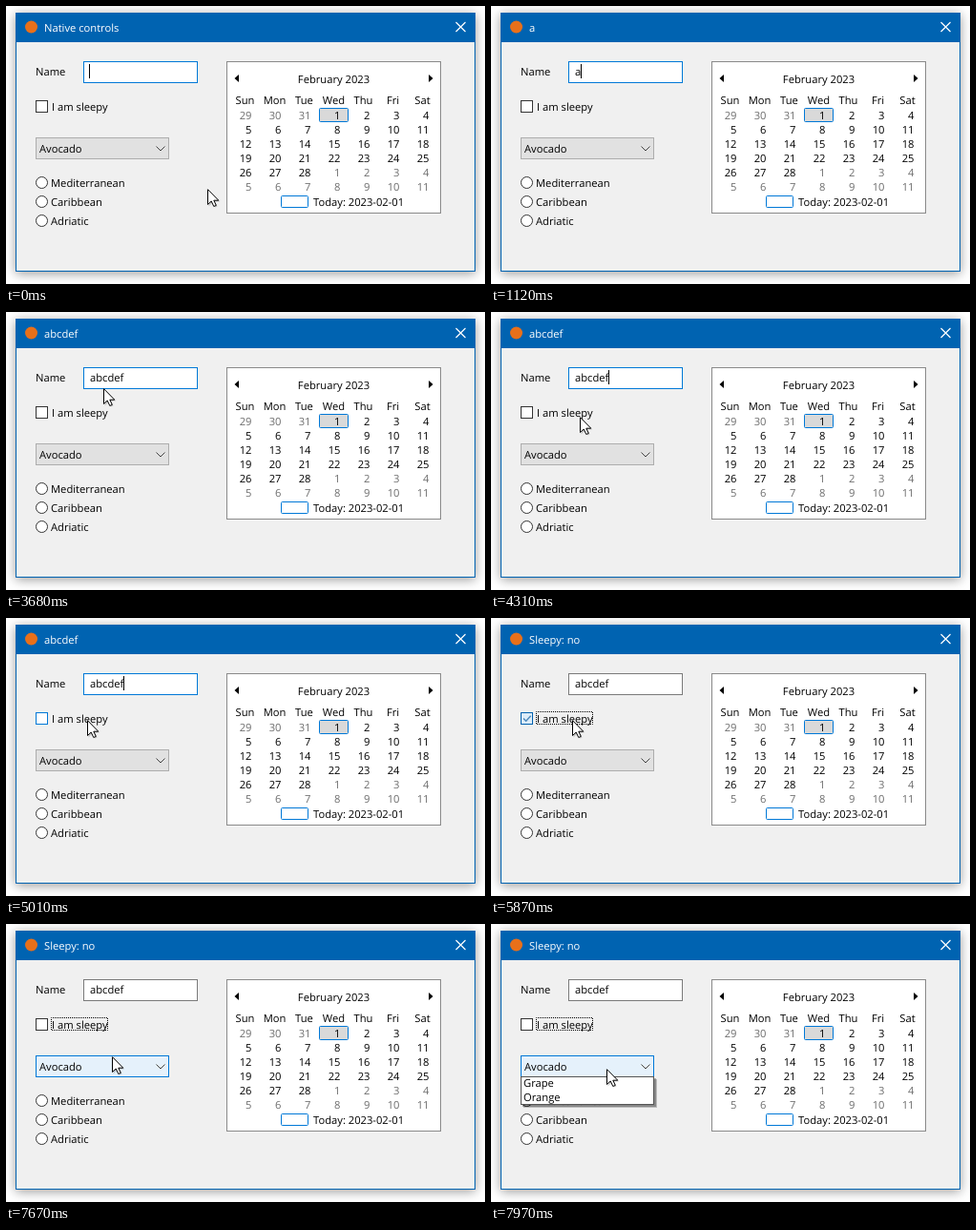
An HTML page for the animation above (8 s loop, 502 px wide and 292 px high).

```html
<!DOCTYPE html>
<html lang="en">
<head>
<meta charset="utf-8">
<title>Native controls</title>
<style>
  html, body { margin: 0; width: 100%; height: 100%; overflow: hidden; background: #fff; }
  #window {
    position: absolute; left: 10px; top: 7px; width: 482px; height: 272px;
    background: #f0f0f0; box-shadow: 0 2px 11px rgba(0, 0, 0, .4);
  }
  svg { position: absolute; left: 0; top: 0; }
  text {
    font: 11.2px "Open Sans", "Noto Sans", sans-serif; text-rendering: geometricPrecision;
    fill: #000; white-space: pre;
  }
  .end { text-anchor: end; }
  .mid { text-anchor: middle; }
  .dim { fill: #6d6d6d; }
  .light { fill: #fff; }
  .line { fill: none; stroke: #000; }
</style>
</head>
<body>
<div id="window"></div>
<svg width="502" height="292" viewBox="0 0 502 292">
  <rect x="10.5" y="7.5" width="481" height="271" fill="none" stroke="#0063b1"/>
  <rect x="10" y="7" width="482" height="31" fill="#0063b1"/>
  <circle cx="26.5" cy="22" r="6.5" fill="#e8701a"/>
  <text id="title" class="light" x="40" y="26.5"></text>
  <path class="line" style="stroke:#fff" stroke-width="1.2" d="M471.5 17l10 10m0-10l-10 10"/>

  <text x="31" y="73">Name</text>
  <rect id="field" x="81.5" y="58.5" width="119" height="22" fill="#fff"/>
  <text id="name" x="88" y="73"></text>
  <rect id="caret" y="61" width="1" height="15"/>

  <rect id="box" x="31.5" y="99.5" width="12" height="12" fill="#fff"/>
  <rect id="press" x="31.5" y="99.5" width="12" height="12" fill="#cce4f7" stroke="#005499"/>
  <path id="check" fill="none" stroke="#005499" stroke-width="1.4" d="M34 105.5l2.700 2.800 5-5.600"/>
  <text x="48" y="110">I am sleepy</text>
  <rect id="focus" class="line" x="47.5" y="98.5" width="59" height="13"
    stroke-dasharray="1" stroke-dashoffset=".5"/>

  <g id="radios"></g>

  <rect id="combo" x="31.5" y="138.5" width="139" height="22"/>
  <text x="35" y="154">Avocado</text>
  <path class="line" style="stroke:#444" d="M157.5 147.5l4.500 4.500 4.500-4.500"/>
  <g id="list">
    <rect x="34" y="163" width="140" height="30" opacity=".22"/>
    <rect x="33" y="162" width="140" height="30" opacity=".28"/>
    <rect x="31.5" y="160.5" width="139" height="29" fill="#fff" stroke="#555"/>
    <text x="34" y="171">Grape</text>
    <text x="34" y="186">Orange</text>
  </g>

  <g id="calendar">
    <rect x="231.5" y="58.5" width="224" height="159" fill="#fff" stroke="#8a8a8a"/>
    <path d="M244 72v8l-4.500-4zM443 72v8l4.500-4z"/>
    <text class="mid" x="343.5" y="81">February 2023</text>
    <rect x="328.5" y="107.5" width="30" height="14" rx="1" fill="#d9d9d9" stroke="#0078d7"/>
    <rect x="288.5" y="199.5" width="28" height="12" rx="1" fill="#fff" stroke="#0078d7"/>
    <text x="322" y="210">Today: 2023-02-01</text>
  </g>

  <g id="cursor">
    <path d="M1.5 1.5v17l4-4 3 5 2-1-2.500-5h5z" opacity=".18"/>
    <path d="M.5.700v15.800l3.700-3.500 2.600 5.500 2.500-1.100-2.500-5.200h5z" fill="#fff" stroke="#000"/>
  </g>
</svg>
<script>
const LOOP = 8000;
const KEY_TIMES = [1120, 1510, 1760, 1920, 2200, 2350];
const FIRST_CLICK = 5150, CLICK_GAP = 685, CLICKS = 4, FADE = 90;

const $ = id => document.getElementById(id);
const set = (id, attrs) => {
  for (const key in attrs) $(id).setAttribute(key, attrs[key]);
};
const show = (id, on) => set(id, { visibility: on ? 'visible' : 'hidden' });
const ease = (t, from, to) => {
  const u = Math.min(1, Math.max(0, (t - from) / (to - from)));
  return u * u * (3 - 2 * u);
};
const bend = (u, a, b, c) => (1 - u) ** 2 * a + 2 * u * (1 - u) * b + u * u * c;
const label = (x, y, text, cls = '') => `<text x="${x}" y="${y}" class="${cls}">${text}</text>`;

$('radios').innerHTML = ['Mediterranean', 'Caribbean', 'Adriatic'].map((text, i) =>
  `<circle cx="37.5" cy="${185.5 + 20 * i}" r="6" fill="#fff" stroke="#333"/>` +
  label(47, 190 + 20 * i, text)).join('');

let days = ['Sun', 'Mon', 'Tue', 'Wed', 'Thu', 'Fri', 'Sat']
  .map((day, i) => label(250.5 + 31 * i, 103, day, 'mid')).join('');
for (let i = 0; i < 42; i++) {
  const date = new Date(2023, 0, 29 + i);
  days += label(257.5 + 31 * (i % 7), 119 + 15 * Math.floor(i / 7), date.getDate(),
    date.getMonth() === 1 ? 'end' : 'end dim');
}
$('calendar').insertAdjacentHTML('beforeend', days);

// The pointer hides while typing, swings over to the checkbox, then drops to the combo box.
function pointer(t) {
  if (t < KEY_TIMES[0]) return [211, 192];
  const swing = ease(t, 3020, 3900);
  const nudge = ease(t, 4310, 4690);
  const drop = ease(t, 7400, 7820);
  return [
    bend(swing, 187, 120, 93) - 8 * nudge + 36 * drop,
    bend(swing, 70, 0, 110) - 3 * nudge + 45 * drop
  ].map(Math.round);
}

function draw(t) {
  const typed = KEY_TIMES.filter(time => time <= t).length;
  const name = 'abcdef'.slice(0, typed);
  const clicks = Math.min(CLICKS, Math.max(0, Math.floor((t - FIRST_CLICK) / CLICK_GAP) + 1));
  const checked = clicks % 2 === 1;
  $('name').textContent = name;
  $('title').textContent = clicks ? `Sleepy: ${checked ? 'yes' : 'no'}` : name || 'Native controls';

  // A keystroke shows the caret at once; otherwise it blinks.
  const sinceKey = t - (KEY_TIMES[typed - 1] || 0);
  set('field', { stroke: clicks ? '#7a7a7a' : '#0078d7' });
  set('caret', { x: name ? Math.round(88 + $('name').getComputedTextLength()) : 87 });
  show('caret', !clicks && (sinceKey < 270 || (t + 440) % 1060 < 530));

  const [x, y] = pointer(t);
  const over = (right, top, bottom) => x >= 31 && x <= right && y >= top && y < bottom;
  set('cursor', { transform: `translate(${x} ${y})` });
  show('cursor', t < KEY_TIMES[0] || t >= 3020);

  const clickTime = FIRST_CLICK + CLICK_GAP * (clicks - 1);
  const fade = clicks ? ease(t, clickTime, clickTime + FADE) : 1;
  set('box', { stroke: over(107, 98, 110) ? '#0078d7' : '#333' });
  set('press', { opacity: 1 - fade });
  set('check', { opacity: checked ? fade : 1 - fade });
  show('focus', clicks);

  const hot = over(171, 138, 161);
  set('combo', { stroke: hot ? '#0078d7' : '#adadad', fill: hot ? '#e5f1fb' : '#e1e1e1' });
  show('list', t >= 7970);
}

const start = performance.now();
function tick() {
  draw((performance.now() - start) % LOOP);
  requestAnimationFrame(tick);
}
tick();
</script>
</body>
</html>
```
